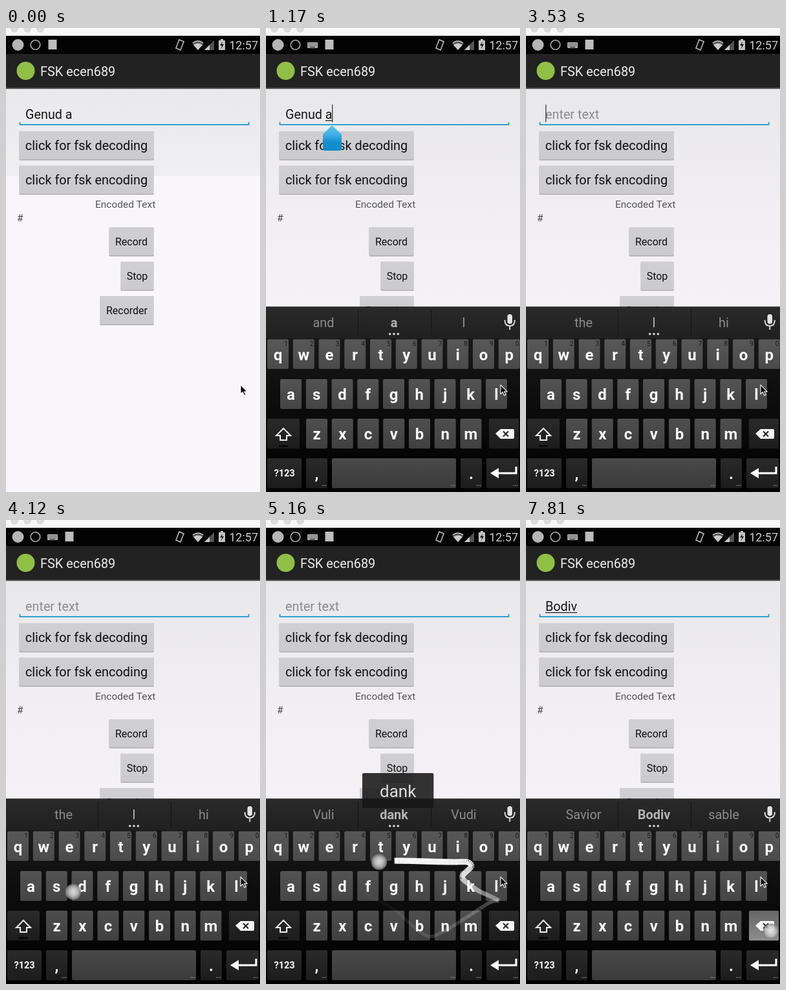
An HTML page with a canvas that plays this animation: 393 by 715 pixels, repeating every 8 s.

```html
<!DOCTYPE html>
<html lang="en">
<head>
<meta charset="utf-8">
<title>Swipe typing</title>
<style>
html, body { margin: 0; width: 393px; height: 715px; overflow: hidden; background: #f7f6fa; }
canvas { display: block; }
</style>
</head>
<body>
<canvas id="stage" width="393" height="715"></canvas>
<script>
const c = document.getElementById('stage').getContext('2d');
const LOOP = 8000, STEP = 147.3;

// Each schedule is a list of [step, value]; the latest started entry counts.
const pick = (list, k) => list.reduce((v, e) => e[0] <= k ? e[1] : v, null);
const TYPED = [[0, 'Genud a'], [15, 'Genud '], [16, 'Genu'], [17, 'G'], [18, ''], [37, 'Bodiv']];
const WORDS = [[0, 'and a I'], [18, 'the I hi'], [30, 'Zobe Vud San'],
  [34, 'Vuli dank Vudi'], [36, 'Savior Bodiv sable']];
const POPUP = [[0, ''], [30, 'Vud'], [34, 'dank'], [36, 'Bodiv'], [37, '']];
const BLINKS = [1, 5, 7, 10, 13, 21, 24, 27, 30, 34, 37, 40, 43, 47, 50, 53];
const SLIDE = [[0, 285], [6, 165], [7, 28], [8, 0]];

// Finger path: [step, x, y]
const PATH = [[28, 104, 573], [28.6, 72, 570], [28.8, 50, 564], [29, 75, 555], [29.3, 118, 561],
  [29.65, 195, 598], [30, 255, 642], [30.6, 345, 590], [31, 360, 586], [32, 328, 571],
  [33.3, 303, 551], [33.7, 318, 534], [33.9, 312, 527], [34.1, 285, 527], [34.6, 203, 525],
  [35, 175, 527], [35.5, 151, 518], [36, 137, 507]];

function finger(t) {
  t = Math.max(28, Math.min(36, t));
  const i = Math.max(0, PATH.findIndex(p => p[0] >= t) - 1);
  const p = j => PATH[Math.max(0, Math.min(PATH.length - 1, i + j))];
  const u = (t - p(0)[0]) / (p(1)[0] - p(0)[0]);
  return [1, 2].map(a => {
    const m0 = (p(1)[a] - p(-1)[a]) * .32, m1 = (p(2)[a] - p(0)[a]) * .32, d = p(1)[a] - p(0)[a];
    return p(0)[a] + u * (m0 + u * (3 * d - 2 * m0 - m1 + u * (m0 + m1 - 2 * d)));
  });
}

function box(x, y, w, h, fill, r = 0) {
  c.fillStyle = fill;
  c.beginPath();
  c.roundRect(x, y, w, h, r);
  c.fill();
}
function disc(x, y, r, fill) {
  c.fillStyle = fill;
  c.beginPath();
  c.arc(x, y, r, 0, 7);
  c.fill();
}
function shape(d, fill, stroke, width = 1) {
  const p = new Path2D(d);
  if (fill) { c.fillStyle = fill; c.fill(p); }
  if (stroke) { c.strokeStyle = stroke; c.lineWidth = width; c.stroke(p); }
}
function text(s, x, y, size, fill, align = 'left', weight = 400) {
  c.font = `${weight} ${size}px Roboto, sans-serif`;
  c.textAlign = align;
  c.fillStyle = fill;
  c.fillText(s, x, y);
}
function fade(y0, y1, ...stops) {
  const g = c.createLinearGradient(0, y0, 0, y1);
  stops.forEach((s, i) => g.addColorStop(i / (stops.length - 1), s));
  return g;
}

function button(label, x, y, size) {
  box(x - .5, y, 229 - x, 45, '#b0afb2', 1.5);
  box(x, y, 228 - x, 43.5, fade(y, y + 44, '#d0cfd2', '#cbcacd'), 1.5);
  text(label, (x + 228) / 2, y + (size > 18 ? 29 : 28.4), size, '#111', 'center');
}

function statusBar(hasKeyboard) {
  box(0, 0, 393, 12, '#f8f7f8');
  [13, 33, 53].forEach(x => disc(x, 1, 6, '#dcdbdc'));
  box(0, 12, 393, 28, '#030303');
  disc(18.5, 26, 9, '#b5b5b5');
  c.strokeStyle = '#aaa';
  c.lineWidth = 1.6;
  c.beginPath();
  c.arc(45.5, 26, 7.3, 0, 7);
  c.stroke();
  if (hasKeyboard) {
    box(64, 22, 16, 9, '#aaa', 1);
    for (let i = 0; i < 6; i++) {
      box(65.5 + i * 2.3, 24, 1, 1, '#222');
      box(65.5 + i * 2.3, 26.5, 1, 1, '#222');
    }
    box(68, 29, 8, 1, '#222');
  }
  box(hasKeyboard ? 91.5 : 65.5, 18, 13, 15, '#bdbdbd');
  shape('M268 18l7 3-5 13-7-3z', null, '#bbb', 1.6);
  shape('M297 34l-9-10q9-8 18 0z', '#555');
  shape('M297 34l-7-8q7-5 14 0z', '#ccc');
  shape('M289 23q8-6 16 0', null, '#ccc', 1.5);
  shape('M307 34h15v-15z', '#555');
  shape('M307 34h8v-8z', '#ccc');
  box(329, 19, 10, 15, '#c4c4c4', 1);
  box(332, 17, 4, 2, '#c4c4c4');
  shape('M335 21l-4 6h3l-1 5 4-7h-3z', '#111');
  text('12:57', 390, 33, 18, '#ccc', 'right');
  box(0, 40, 393, 53, '#222');
  box(0, 92, 393, 2, '#5a5a5a');
  disc(30.5, 66, 14, '#8fc045');
  text('FSK ecen689', 53, 74, 19.9, '#ededed');
}

function form(k) {
  box(0, 93, 393, 622, k < 6 ? fade(93, 229, '#e9e8eb', '#f0eff1') : fade(93, 430, '#e8e7e9', '#f0eef2', '#f4f2f6'));
  if (k < 6) box(0, 228, 393, 487, '#f8f6fa');
  statusBar(k >= 6);
  const typed = pick(TYPED, k), size = 19.8;
  text(typed || 'enter text', 30, 140, size, typed ? '#161616' : '#8b8b8c');
  const end = 30 + (typed && c.measureText(typed).width);
  if (k >= 37 || k >= 5 && k < 15) {
    const start = k < 15 ? 30 + c.measureText('Genud ').width : 30;
    box(start, 142, end - start, 1.3, '#222');
  }
  if (BLINKS.filter(b => b <= k).length % 2) box(Math.floor(end), 118, 1.4, 27, '#444');
  shape('M21.5 145v4h354v-4', null, '#2fa3d0', 2);

  button('click for fsk decoding', 21, 159, 19.9);
  button('click for fsk encoding', 21, 212, 19.9);
  text('Encoded Text', 138, 277, 15.5, '#555');
  text('#', 17, 298, 15.5, '#444');
  button('Record', 160, 307, 16);
  button('Stop', 178, 360, 16);
  button('Recorder', 146, 413, 16);

  if (k >= 5 && k < 15) {
    shape('M102 150l15 14v22q0 3-3 3H91q-3 0-3-3v-22z', fade(150, 189, '#55c2f0', '#45b3e6', '#138fd0', '#118cce'));
  }
}

// Keys get darker towards the bottom of the board.
function key(label, x, y, w, dark) {
  const grey = v => `rgb(${v},${v},${v})`;
  const top = dark ? 42 : 88 - (y - 479) * .08;
  box(x, y, w, 47, '#060606', 2);
  box(x, y, w, 46, fade(y, y + 46, grey(top), grey(top - 14)), 2);
  text(label, x + w / 2, y + (label.length > 1 ? 28 : 32), label.length > 1 ? 14.5 : 24, '#fafafa', 'center', 700);
}
function dots(x, y, gap, r, fill) {
  [-1, 0, 1].forEach(i => disc(x + i * gap, y, r, fill));
}

function keyboard(k) {
  box(0, 429.5, 393, 286, fade(430, 715, '#1e1e1e', '#0d0d0d', '#000'));
  box(0, 429.5, 393, 48.5, fade(430, 478, '#2a2a2a', '#202020'));
  [142, 255].forEach(x => box(x, 434, 1, 40, '#141414'));
  const [left, mid, right] = pick(WORDS, k).split(' ');
  text(left, 89, 461, 19.9, '#8c8c8c', 'center');
  text(mid, 198, 461, 19.9, '#b4b4b4', 'center', mid == 'I' ? 400 : 700);
  text(right, 306, 461, 19.9, '#8c8c8c', 'center');
  dots(198, 471.5, 6.3, 1.7, '#ddd');
  box(373.5, 441, 7.5, 15, '#e4e4e4', 4);
  shape('M369.5 450q0 9 7.7 9t7.7-9M377.2 459v6', null, '#d8d8d8', 2);

  const row = (letters, x, y) => [...letters].forEach((ch, i) => key(ch, x + i * 39.75, y, 33));
  row('qwertyuiop', 2, 479.5);
  [...'1234567890'].forEach((n, i) => text(n, 31 + i * 39.75, 490, 10.5, '#1b1b1b', 'center'));
  row('asdfghjkl', 22, 541);
  row('zxcvbnm', 62, 602);
  key('', 2, 602, 50, true);
  shape('M27 617l11 11h-6v7H22v-7h-6z', null, '#f2f2f2', 2);
  box(20, 643, 14, 2.5, '#050505');

  key('', 345, 602, 46, true);
  const pressed = k >= 12 && k < 21 || k >= 52;
  if (pressed) box(345, 602, 46, 46, fade(602, 648, '#666', '#8e8e8e'), 2);
  shape('M355 625l8-7h19q2 0 2 2v11q0 2-2 2h-19z', '#f5f5f5');
  shape('M367 621.5l8 8m0-8l-8 8', null, '#222', 2);

  key('?123', 2, 663, 53, true);
  key(',', 62, 663, 33, true);
  key('', 102, 663, 192);
  key('.', 301, 663, 33, true);
  key('', 341, 663, 50, true);
  shape('M387 676v10h-30', null, '#fff', 3);
  shape('M347 686l13-8v16z', '#fff');
  [90, 289, 329, 386].forEach(x => dots(x, 705, 2.6, .8, '#999'));
}

function trail(k) {
  const end = k > 36 ? 36 : k - .35;
  for (let s = 28; s < end; s += .04) {
    const alpha = Math.min(.95, 1.12 - (k - s) * .2);
    if (alpha <= 0) continue;
    c.strokeStyle = `rgba(255,255,255,${alpha})`;
    c.lineWidth = 4.5 + 5 * alpha;
    c.beginPath();
    c.moveTo(...finger(s));
    c.lineTo(...finger(Math.min(end, s + .043)));
    c.stroke();
  }
}

function touch(x, y) {
  const g = c.createRadialGradient(x, y, 2, x, y, 13);
  g.addColorStop(0, 'rgba(228,228,228,.9)');
  g.addColorStop(.5, 'rgba(196,196,196,.85)');
  g.addColorStop(.85, 'rgba(135,135,135,.8)');
  g.addColorStop(1, 'rgba(120,120,120,0)');
  disc(x, y, 13, g);
}

function popup(word, x, y) {
  c.font = '400 26px Roboto, sans-serif';
  const w = c.measureText(word).width + 54, left = Math.min(x - 26, 393 - w);
  box(left, y - 137, w, 54, 'rgba(22,22,22,.87)', 2);
  text(word, left + w / 2, y - 100, 26, '#ddd', 'center');
}

function draw(k) {
  form(k);
  const slide = pick(SLIDE, k);
  c.save();
  c.translate(0, slide);
  if (slide < 285) keyboard(k);
  c.restore();
  if (k >= 28 && k < 43) trail(k);
  if (k >= 3 && k < 5) touch(209, 133);
  if (k >= 12 && k < 21) touch(379, 640);
  if (k >= 52) touch(379, 634);
  if (k >= 27 && k < 37) {
    const [x, y] = finger(k), word = pick(POPUP, k);
    touch(x, y);
    if (word) popup(word, x, y);
  }
  shape('M363 550v14l3.3-3 2.3 5.2 2.4-1-2.3-5h4.3z', '#000', '#fff', 1.1);
}

function tick(now) {
  draw(Math.floor((now % LOOP + 14) / STEP));
  requestAnimationFrame(tick);
}
requestAnimationFrame(tick);
</script>
</body>
</html>
```
